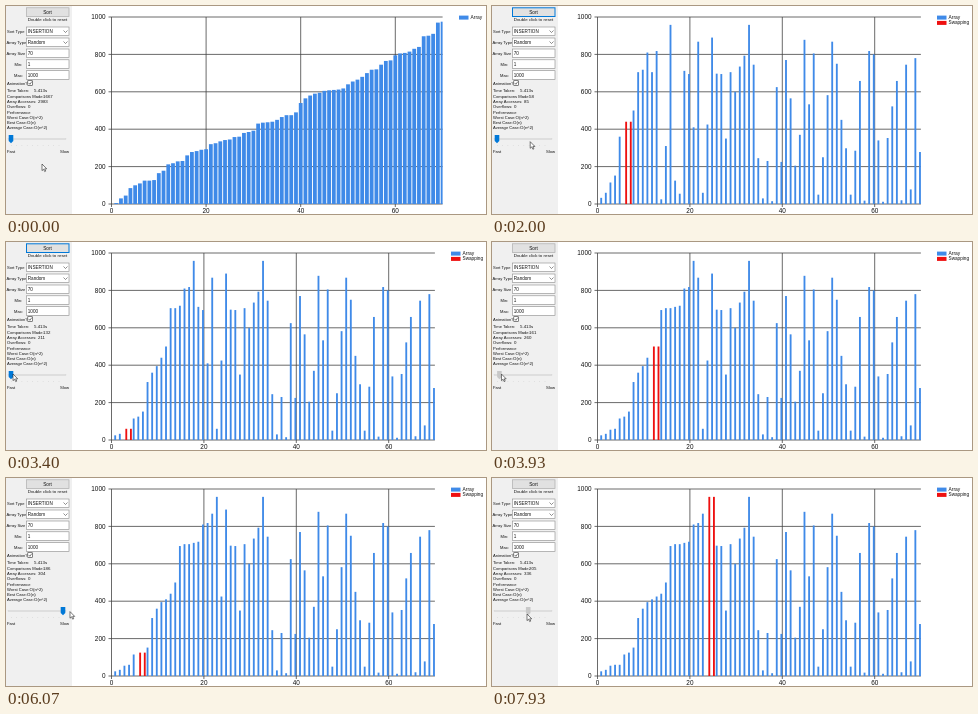
An HTML page that plays this animation: 480 by 208 pixels, repeating every 8000 ms.

```html
<!DOCTYPE html>
<html lang="en">
<head>
<meta charset="utf-8">
<title>Insertion sort</title>
<style>
html, body { margin: 0; width: 100%; height: 100%; overflow: hidden; background: #fff; }
svg { display: block; width: 480px; height: 208px; font-family: "Liberation Sans", Arial, sans-serif; }
</style>
</head>
<body>
<svg id="stage" viewBox="0 0 480 208"></svg>
<script>
const LOOP = 8000, RESET = 620, START = 1153, STEP = 23.5;
const BLUE = '#3f8ae8', RED = '#ee1010';
const sorted = [
  5, 30, 45, 85, 100, 110, 125, 125, 128, 165, 178, 212, 218, 228, 230, 260, 278, 283, 290, 293,
  320, 325, 335, 342, 345, 358, 360, 380, 385, 392, 430, 435, 437, 440, 450, 465, 475, 475, 490, 540,
  565, 580, 590, 595, 605, 608, 610, 612, 618, 640, 655, 665, 680, 700, 718, 720, 745, 765, 768, 795,
  805, 808, 815, 830, 840, 897, 900, 910, 970, 975];
const shuffled = [
  500, 152, 705, 718, 440, 33, 360, 60, 115, 395, 810, 705, 818, 25, 310, 958, 125, 55, 712, 695,
  410, 868, 60, 425, 890, 697, 695, 350, 705, 600, 735, 793, 958, 745, 245, 30, 230, 15, 625, 225,
  770, 565, 205, 370, 878, 533, 805, 50, 250, 582, 868, 750, 450, 298, 50, 285, 658, 18, 818, 800,
  340, 12, 353, 522, 658, 20, 745, 78, 780, 278];

// Keys are [time, value...]; linear between them.
function track(keys, t) {
  const n = keys.findIndex(k => k[0] > t);
  if (n < 0) return keys[keys.length - 1].slice(1);
  const a = keys[n - 1], b = keys[n], p = (t - a[0]) / (b[0] - a[0]);
  return a.slice(1).map((v, i) => v + (b[i + 1] - v) * p);
}

const slider = t => track([[0, 0], [3900, 0], [4500, .9], [4700, .9], [5000, 1], [7300, 1], [7800, .6]], t)[0];
const cursor = t => track([
  [0, 36, 158], [150, 36, 158], [480, 40, 5], [1130, 40, 5], [1390, 39, 129], [1800, 39, 133],
  [2550, 36, 143], [2900, 34, 143], [3350, 7, 132], [3900, 7, 132], [4500, 55, 133], [4700, 57, 133],
  [5000, 64, 133], [6800, 64, 134], [7200, 57, 135], [7300, 57, 135], [7800, 35, 136]], t);

// Run the sort once, noting the state after every move; the slider sets the delay.
function runSort() {
  const a = shuffled.slice(), log = [];
  let t = START, shifts = 0, passes = 0, skipped = 0, pair = [];
  const note = () => {
    log.push({ t, a: a.slice(), pair, made: shifts + 3 * passes + 2 - skipped, accesses: 2 * shifts + 3 * passes });
    t += STEP + 110 * slider(t);
  };
  for (let i = 1; i < a.length && t < LOOP; i++) {
    const key = a[i];
    let j = i - 1;
    passes++;
    for (; j >= 0 && a[j] > key; j--) {
      a[j + 1] = a[j];
      shifts++;
      pair = [j, j + 1];
      note();
    }
    if (j < 0 && i > 5) skipped++;
    a[j + 1] = key;
    note();
  }
  return log;
}
const log = runSort();

const rect = (x, y, w, h, fill, more = '') =>
  `<rect x="${x}" y="${y}" width="${w}" height="${h}" fill="${fill}" ${more}/>`;
const text = (x, y, s, size = 4.3, anchor = 'start') =>
  `<text x="${x}" y="${y}" font-size="${size}" text-anchor="${anchor}" fill="#111">${s}</text>`;
const line = (d, color = '#444', w = .8) => `<path d="${d}" fill="none" stroke="${color}" stroke-width="${w}"/>`;

function field(y, label, value, x, combo) {
  return text(x, y + 6.2, label, 4.1) +
    rect(20.3, y, 42.7, 8.6, '#fff', 'stroke="#8a8a8a" stroke-width=".6"') +
    text(21.8, y + 6, value, 4.6) + (combo ? line(`M57.5 ${y + 3.5}l2 2l2-2`, '#444', .6) : '');
}

function panel(t, state) {
  const focus = t > 500 && t < 3700, s = slider(t), x = 5 + 52 * s;
  const drag = (t > 3850 && t < 5000) || t > 7250;
  const rows = [
    [84, 'Time Taken:', 28, '5.413s'],
    [90, 'Comparisons Made:', 37, state ? state.made : 1667],
    [95, 'Array Accesses:', 32, state ? state.accesses : 2983],
    [100, 'Overflows:', 22, '0'],
    [106, 'Performance', 0, ''],
    [111, 'Worst Case:', 23.5, 'O(n^2)'],
    [116, 'Best Case:', 21, 'O(n)'],
    [121.3, 'Average Case:', 28, 'O(n^2)']];
  return rect(0, 0, 66, 208, '#f0f0f0') +
    rect(20.5, 1.8, 42.5, 8.7, '#e1e1e1', `stroke="${focus ? '#0078d7' : '#adadad'}" stroke-width="${focus ? 1 : .7}"`) +
    text(41.5, 7.8, 'Sort', 4.7, 'middle') +
    text(41.5, 14.8, 'Double click to reset', 4.4, 'middle') +
    field(21, 'Sort Type', 'INSERTION', 1, true) +
    field(32, 'Array Type', 'Random', .5, true) +
    field(43, 'Array Size', '70', .5) +
    field(53.8, 'Min:', '1', 8.5) +
    field(64.7, 'Max:', '1000', 8) +
    text(1, 78.7, 'Animation?', 4.1) +
    rect(21.8, 74.7, 4.8, 4.8, '#fff', 'stroke="#333" stroke-width=".6"') +
    line('M22.8 77l1.1 1.3l1.9-2.7', '#222', .6) +
    rows.map(([y, label, vx, v]) => text(1, y + 1.5, label, 4.1) + text(vx, y + 1.5, v, 4.4)).join('') +
    rect(2, 132.3, 58, 1.4, '#e2e2e2', 'stroke="#ccc" stroke-width=".3"') +
    line('M5 139.5H58', '#d4d4d4', 1).replace('/>', ' stroke-dasharray=".6 4.7"/>') +
    `<path d="M${x - 2.3} 129h4.6v6l-2.3 2.3l-2.3-2.3z" fill="${drag ? '#c8c8c8' : '#0078d7'}"/>` +
    text(1, 146.6, 'Fast', 4.2) + text(54, 146.6, 'Slow', 4.2);
}

function chart(values, pair, two) {
  const x0 = 105.5, base = 198, unit = two ? 4.62 : 4.73, right = x0 + 70 * unit;
  let out = '';
  for (let v = 0; v <= 1000; v += 200) {
    const y = base - v * .187;
    out += line(`M102.5 ${y}H${right}`) + text(99.5, y + 2.2, v, 6.4, 'end');
  }
  for (let v = 0; v <= 60; v += 20) {
    const x = x0 + v * unit;
    out += line(`M${x} 11V201`) + text(x, 207, v, 6.4, 'middle');
  }
  values.forEach((v, i) => {
    const hot = pair.includes(i), half = .4 * unit, h = v * .187;
    const x = x0 + (i + 1) * unit - (hot ? 0 : half);
    const w = Math.min(two ? half : 2 * half, right - x);
    if (w > 0) out += rect(x, base - h, w, h, hot ? RED : BLUE);
  });
  const lx = two ? 445 : 453;
  out += rect(lx, 9.6, 9.5, 4, BLUE) + text(lx + 11.5, 13.3, 'Array', 4.9);
  if (two) out += rect(lx, 14.9, 9.5, 4, RED) + text(lx + 11.5, 18.4, 'Swapping', 4.7);
  return out;
}

const stage = document.getElementById('stage');
function draw(now) {
  const t = now % LOOP;
  const state = log.filter(s => s.t <= t).pop();
  const values = state ? state.a : t < RESET ? sorted : shuffled;
  const [x, y] = cursor(t);
  stage.innerHTML = rect(0, 0, 480, 208, '#fff') +
    chart(values, state ? state.pair : [], !!state) + panel(t, state) +
    `<path transform="translate(${x} ${y})" d="M0 0V6.6L1.6 5.2L2.7 7.6L3.7 7.1L2.7 4.8H4.7z" fill="#fff" stroke="#222" stroke-width=".6"/>`;
  requestAnimationFrame(draw);
}
requestAnimationFrame(draw);
</script>
</body>
</html>
```
